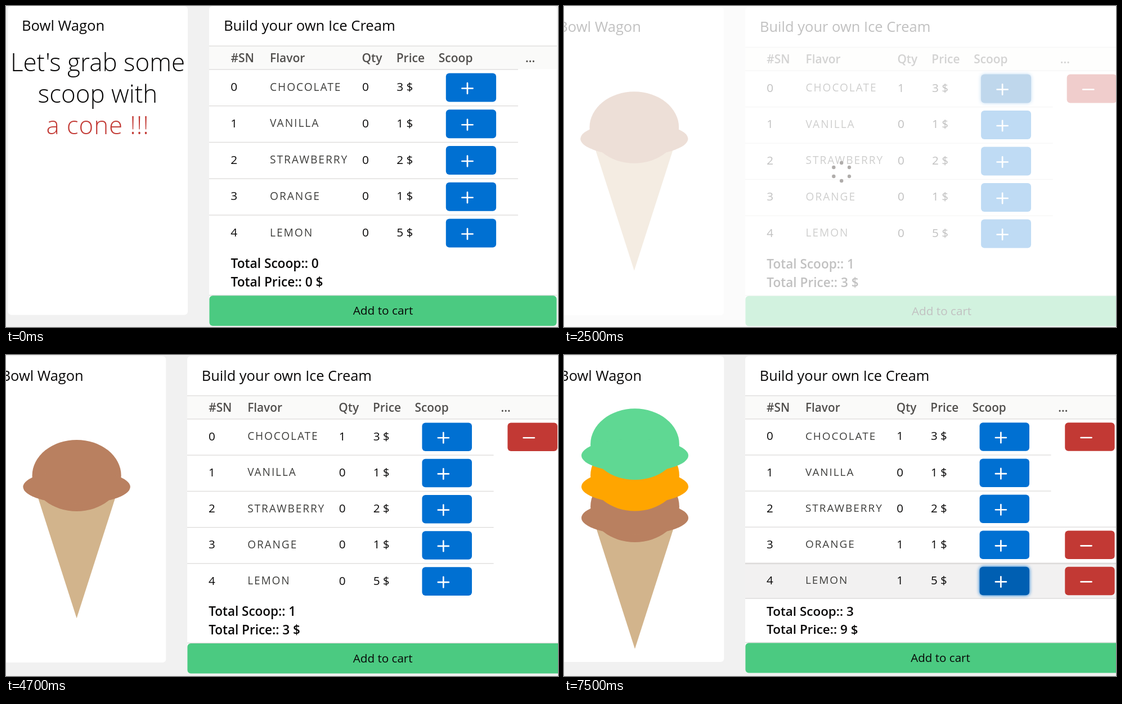
Write an HTML page that moves like this. It is 981 px wide and 571 px high and loops after 8 s.

```html
<!DOCTYPE html>
<html lang="en">
<head>
<meta charset="utf-8">
<title>Build your own Ice Cream</title>
<style>
  html, body { margin: 0; width: 100%; height: 100%; overflow: hidden; background: #f1f1f1; }
  svg { display: block; width: 981px; height: 571px; }
  text { font: 20.8px "Open Sans", "Noto Sans", sans-serif; fill: #080707; white-space: pre; }
  .title { font-size: 25.6px; }
  .big { font-size: 43.9px; font-weight: 300; text-anchor: middle; }
  .red { fill: #c23934; letter-spacing: .9px; }
  .head { font-weight: 600; font-size: 21px; fill: #514f4d; }
  .flavor { font-size: 19.2px; letter-spacing: 1.95px; fill: #3e3e3c; }
  .total { font-size: 22.7px; font-weight: 600; }
  .mid { text-anchor: middle; }
  .tip { font-size: 11px; fill: #575757; }
  .focus { filter: drop-shadow(0 0 3px #0070d2); }
</style>
</head>
<body>
<svg id="stage" viewBox="0 0 981 571"></svg>
<script>
const stage = document.getElementById('stage');
const LOOP = 8000, LINE = '#dddbda';
const ROW_TOP = 112.3, ROW_H = 64.75, TABLE_W = 549;

const flavors = [
  { name: 'CHOCOLATE', price: 3, color: '#b98060' },
  { name: 'VANILLA', price: 1 },
  { name: 'STRAWBERRY', price: 2 },
  { name: 'ORANGE', price: 1, color: '#ffa500' },
  { name: 'LEMON', price: 5, color: '#5fd893' }
];

// x, y, s: camera; scoops: flavors in the cone, bottom first
const states = [
  { at: 0, x: 361, y: 0, s: 1, w: 618, scoops: [] },
  { at: 500, x: 364.8, y: -.1, s: 1.0055, w: 618, scoops: [], row: 0, button: 0, tip: true },
  { at: 2500, x: 322, y: 2.6, s: .996, w: 701, scoops: [0], button: 0, focus: true, busy: true },
  { at: 3500, x: 322, y: 1.9, s: .992, w: 701, scoops: [0] },
  { at: 5500, x: 319, y: 2.7, s: .9965, w: 701, scoops: [0, 3], row: 3, button: 3, focus: true },
  { at: 7500, x: 322, y: 2, s: .99, w: 701, scoops: [0, 3, 4], row: 4, button: 4, focus: true }
];

const rect = (x, y, w, h, fill, r = 0, more = '') =>
  `<rect x="${x}" y="${y}" width="${w}" height="${h}" rx="${r}" fill="${fill}" ${more}/>`;
const text = (x, y, str, cls = '') => `<text x="${x}" y="${y}" class="${cls}">${str}</text>`;
const ellipse = (x, y, rx, ry, fill) =>
  `<ellipse cx="${x}" cy="${y}" rx="${rx}" ry="${ry}" fill="${fill}"/>`;
const rule = (y, w, h = 1.3) => rect(0, y, w, h, LINE);

function button(x, y, fill, plus, focus) {
  const cx = x + 38.2, cy = y + 27;
  const vertical = plus ? `M${cx} ${cy - 9.3}v18.6` : '';
  return rect(x, y, 89.3, 51, fill, 6, focus ? 'class="focus"' : '') +
    `<path d="M${cx - 9.6} ${cy}h19.2${vertical}" stroke="#fff" stroke-width="2.7" stroke-linecap="round"/>`;
}

function cone(scoops) {
  const x = -198, shift = 28 * (scoops.length - 1), tip = 470 + shift;
  const parts = scoops.map((id, i) => {
    const y = 214.3 + shift - 56 * i, color = flavors[id].color;
    return ellipse(x, y, 79.7, 64, color) + ellipse(x, y + 20.3, 96, 30, color);
  });
  return `<path d="M${x} ${tip}l-75-234h150z" fill="#d2b48c"/>` + parts.join('');
}

const slogan = () =>
  text(-198, 116, "Let's grab some", 'big') +
  text(-198, 172, 'scoop with', 'big') +
  text(-198, 228, 'a cone !!!', 'big red');

function tableRow(st, flavor, i) {
  const y = ROW_TOP + ROW_H * i, base = y + 38.7;
  const qty = st.scoops.filter(id => id === i).length;
  const w = qty ? st.w : TABLE_W;
  const hover = st.row === i, active = st.button === i;
  return (hover ? rect(0, y, w, ROW_H, '#f2f1f1') + rule(y + ROW_H - 1.3, w) : '') +
    rule(y, w, hover ? 2.6 : 1.3) +
    text(38.3, base, i) + text(108, base - .5, flavor.name, 'flavor') +
    text(272, base, qty) + text(333.3, base, flavor.price + ' $') +
    button(420.8, y + 7.2, active ? '#005fb2' : '#0070d2', true, active && st.focus) +
    (qty ? button(574, y + 7.2, '#c23934', false) : '');
}

function table(st) {
  const heads = [[38.5, '#SN'], [108, 'Flavor'], [271.5, 'Qty'], [332.7, 'Price'], [407.8, 'Scoop'], [562, '...']];
  const price = st.scoops.reduce((sum, id) => sum + flavors[id].price, 0);
  return rect(0, 0, st.w, 569, '#fff', 6) +
    text(26, 44, 'Build your own Ice Cream', 'title') +
    rect(0, 71, st.w, 41.3, '#fafaf9') + rule(70.5, st.w) +
    heads.map(([x, label]) => text(x, 99.7, label, 'head')).join('') +
    flavors.map((f, i) => tableRow(st, f, i)).join('') +
    text(38.5, 466.3, 'Total Scoop:: ' + st.scoops.length, 'total') +
    text(38.5, 499.2, `Total Price:: ${price} $`, 'total') +
    rule(513.9, st.w) + rect(.4, 515.3, st.w - .8, 53.8, '#4bca81', 6) +
    text(st.w / 2, 549.3, 'Add to cart', 'mid');
}

function spinner() {
  const dots = [...Array(6).keys()].map(k => {
    const a = k * Math.PI / 3;
    return ellipse(493.2 + 16 * Math.sin(a), 295 - 16 * Math.cos(a), 3.2, 3.2, '#b0adab');
  });
  return rect(0, 0, 981, 571, 'rgba(255,255,255,.75)') + dots.join('');
}

const tooltip = () =>
  rect(848.5, 157.5, 68, 23, '#fff', 0, 'stroke="#575757"') + text(855, 173.3, 'Add Scoop', 'tip');

function draw(st) {
  stage.innerHTML =
    `<g transform="translate(${st.x} ${st.y}) scale(${st.s})">` +
    rect(-357.5, 0, 319.5, 549.5, '#fff', 6) +
    text(-333, 44, 'Bowl Wagon', 'title') +
    (st.scoops.length ? cone(st.scoops) : slogan()) +
    table(st) + '</g>' +
    (st.busy ? spinner() : '') + (st.tip ? tooltip() : '');
}

const start = performance.now();
let shown;
function tick() {
  const t = (performance.now() - start) % LOOP;
  const st = states.filter(s => s.at <= t).pop();
  if (st !== shown) draw(shown = st);
  requestAnimationFrame(tick);
}
tick();
</script>
</body>
</html>
```
